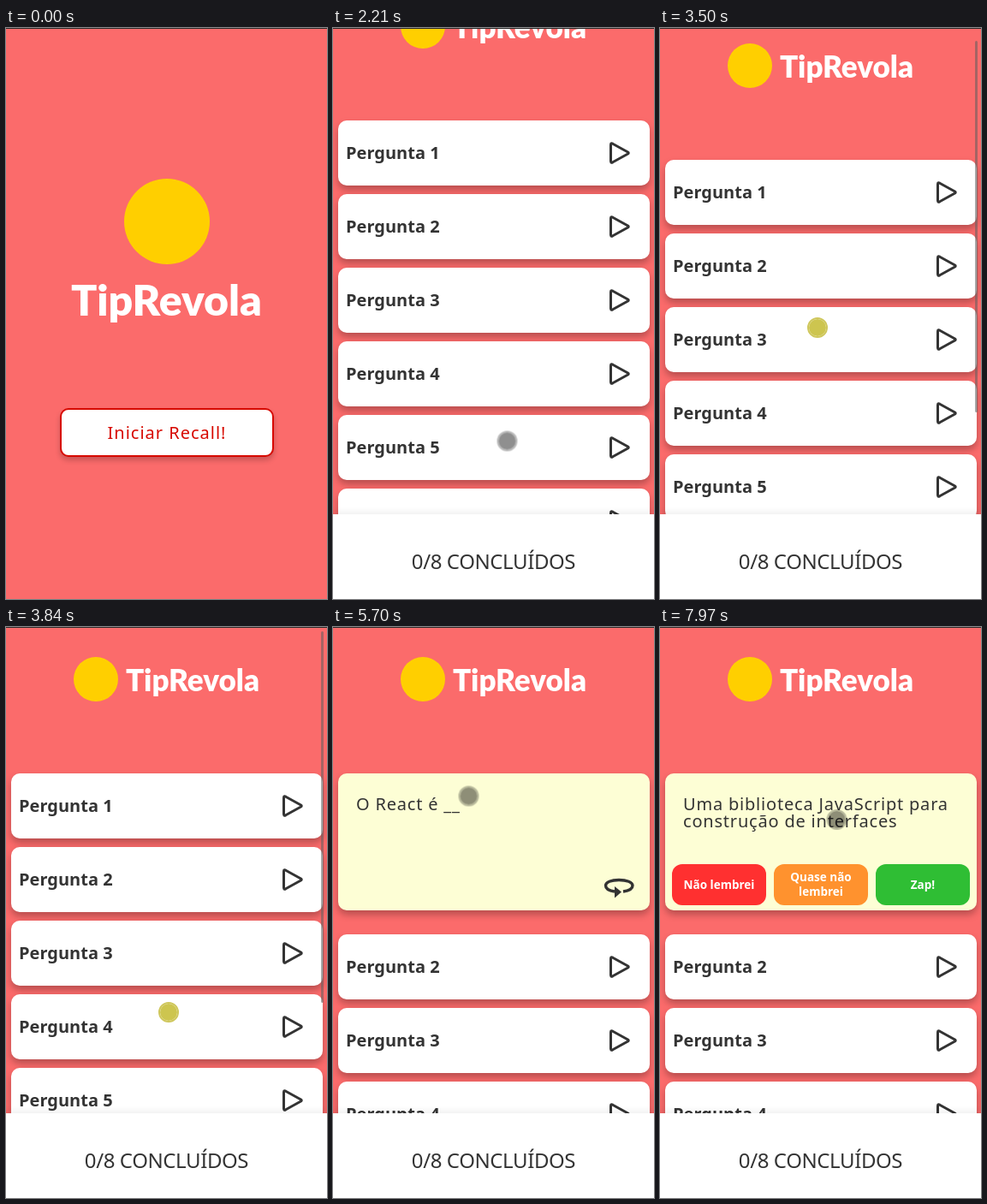
These frames come from a looping animation (375 by 667 pixels, 8 s). An HTML page:

```html
<!DOCTYPE html>
<html lang="pt-BR">
<head>
<meta charset="utf-8">
<title>Flashcards</title>
<style>
  html, body { margin: 0; width: 100%; height: 100%; overflow: hidden; background: #fb6b6b; }
  body { position: relative; font: 400 20px/20px "Noto Sans", "Open Sans", sans-serif; color: #333; }
  div, svg { position: absolute; box-sizing: border-box; white-space: nowrap; }

  /* Every track shares one clock; values hold unless a keyframe says otherwise. */
  .track { animation: 8s steps(1) infinite; }

  #stage { left: 0; top: 0; width: 375px; height: 667px; overflow: hidden; background: #fb6b6b; }
  .full { inset: 0; }
  .edge { left: 0; top: 0; width: 100%; height: 1px; background: #2b2b2b; }

  .mark { border-radius: 50%; background: #ffcf00; }
  .brand { font-family: Lato, Inter, sans-serif; font-weight: 900; color: #fff; text-align: center; }

  #home { animation-name: home; }
  #home .mark { left: 138px; top: 176px; width: 100px; height: 100px; }
  #home .brand { left: 0; top: 287px; width: 375px; font-size: 50px; line-height: 60px; }
  .start {
    left: 63px; top: 444px; width: 250px; height: 57px; border: 2px solid #d70900; border-radius: 10px;
    background: #fff; color: #d70900; text-align: center; line-height: 53px; letter-spacing: 1px;
    box-shadow: 0 4px 6px rgba(0, 0, 0, .2);
  }

  #deck { animation-name: deck; }
  #scroll { animation-name: scroll; }
  #deck .mark { left: 79px; top: 35px; width: 52px; height: 52px; }
  #deck .brand { left: 118px; top: 41px; width: 200px; font-size: 35px; line-height: 40px; }

  .card {
    left: 6px; width: 364px; height: 76px; border-radius: 10px; background: #fff;
    box-shadow: 0 5px 9px rgba(0, 0, 0, .27);
    padding-left: 9px; font-weight: 700; line-height: 75px;
  }
  .card svg { left: 314px; top: 23px; width: 30px; height: 30px; }
  #closed { animation-name: closed; }
  #rest { animation-name: shift; }

  .open {
    top: 171px; height: 160px; padding: 26px 0 0 21px; background: #fdfed5;
    font-weight: 400; line-height: 20px; letter-spacing: .8px;
  }
  #ask { animation-name: ask; }
  #ask svg { left: 306px; top: 118px; width: 44px; height: 32px; }
  #answer { animation-name: answer; }
  .rate {
    top: 106px; width: 110px; height: 48px; border-radius: 12px; color: #fff; text-align: center;
    display: flex; align-items: center; justify-content: center;
    font-size: 13.5px; font-weight: 600; line-height: 17px; letter-spacing: 0;
  }

  .foot {
    left: 0; top: 568px; width: 375px; height: 99px; background: #fff; text-align: center;
    font-size: 24px; line-height: 24px; padding-top: 43px; letter-spacing: -.4px;
    box-shadow: 0 -4px 6px rgba(0, 0, 0, .05);
  }
  #thumb {
    left: 368px; top: 5px; width: 3px; height: 434px; border-radius: 2px;
    background: rgba(95, 95, 95, .55); animation-name: thumb;
  }
  #touch { left: -12px; top: -12px; width: 24px; height: 24px; animation-name: touch; }
  #dot {
    inset: 0; border-radius: 50%; border: 2px solid rgba(0, 0, 0, .27);
    background: rgba(0, 0, 0, .44); background-clip: padding-box; animation-name: press;
  }

  @keyframes home { 0% { visibility: visible } 26.75%, 100% { visibility: hidden } }
  @keyframes deck { 0% { visibility: hidden } 26.75%, 100% { visibility: visible } }
  @keyframes closed { 0% { opacity: 1 } 61%, 100% { opacity: 0 } }
  @keyframes ask { 0% { opacity: 0 } 61% { opacity: 1 } 79.125%, 100% { opacity: 0 } }
  @keyframes answer { 0% { opacity: 0 } 79.125%, 100% { opacity: 1 } }
  @keyframes shift { 0% { transform: none } 61%, 100% { transform: translateY(102px) } }
  @keyframes scroll {
    0% { transform: translateY(-63px) }
    41.125% { transform: translateY(-63px); animation-timing-function: steps(3) }
    43.75% { transform: translateY(-17px) }
    44.625%, 100% { transform: translateY(0) }
  }
  @keyframes thumb {
    0% { opacity: 0; transform: translateY(38px) }
    41.125% { opacity: 1; transform: translateY(38px); animation-timing-function: steps(3) }
    43.75% { opacity: 1; transform: translateY(10px) }
    44.625% { opacity: 1; transform: none }
    49.75% { opacity: .5; transform: none }
    51.5%, 100% { opacity: 0; transform: none }
  }
  @keyframes press {
    0% { background-color: rgba(0, 0, 0, .44); border-color: rgba(0, 0, 0, .27) }
    39.375% { background-color: #cdc54f; border-color: #cfc75c }
    51.5%, 100% { background-color: rgba(0, 0, 0, .44); border-color: rgba(0, 0, 0, .27) }
  }
  @keyframes touch {
    0% { opacity: 0; transform: translate(148px, 287px) }
    4.875% { opacity: 1; transform: translate(148px, 287px) }
    5.75% { opacity: 1; transform: translate(186px, 352px) }
    6.625% { transform: translate(232px, 430px) }
    7.5% { transform: translate(209px, 487px) }
    19.25% { transform: translate(206px, 485px) }
    20.125% { transform: translate(203.5px, 482.5px) }
    35.875% { transform: translate(200px, 450px); animation-timing-function: steps(4) }
    39.375% { transform: translate(184px, 288px); animation-timing-function: steps(2) }
    41.125% { transform: translate(184px, 304px); animation-timing-function: steps(3) }
    43.75% { transform: translate(184px, 350px) }
    44.625% { transform: translate(186px, 367px) }
    45.375% { transform: translate(188px, 390px); animation-timing-function: steps(3) }
    48% { transform: translate(190px, 450px) }
    51.5% { transform: translate(192px, 438px); animation-timing-function: steps(4) }
    55% { transform: translate(268px, 250px); animation-timing-function: steps(2) }
    56.75% { transform: translate(332.5px, 230.5px); animation-timing-function: steps(2) }
    58.5% { transform: translate(334px, 212px) }
    68.625% { transform: translate(316px, 210px); animation-timing-function: steps(3) }
    71.25% { transform: translate(158.5px, 197.5px); animation-timing-function: steps(2) }
    73% { transform: translate(136px, 201px); animation-timing-function: steps(2) }
    74.75% { transform: translate(160px, 216px); animation-timing-function: steps(4) }
    78.25% { transform: translate(335px, 314px) }
    79.125% { transform: translate(338px, 315px); animation-timing-function: steps(3) }
    82.5% { transform: translate(341.5px, 316.5px) }
    86.75% { transform: translate(338px, 315px); animation-timing-function: steps(3) }
    89.375% { transform: translate(318px, 310px) }
    92.625% { transform: translate(314px, 305px); animation-timing-function: steps(3) }
    95.25% { transform: translate(289px, 270px); animation-timing-function: steps(5) }
    99.625%, 100% { opacity: 1; transform: translate(206.5px, 225px) }
  }
</style>
</head>
<body>
<div id="stage">
  <div id="home" class="full track">
    <div class="mark"></div>
    <div class="brand">TipRevola</div>
    <div class="start">Iniciar Recall!</div>
  </div>

  <div id="deck" class="full track">
    <div id="scroll" class="full track">
      <div class="mark"></div>
      <div class="brand">TipRevola</div>
      <div id="closed" class="full track"></div>
      <div id="ask" class="card open track">O React é __
        <svg viewBox="0 0 44 32" fill="none" stroke="#333" stroke-width="3.4">
          <path d="M17 20C10 19 6.500 16.500 6.500 13 6.500 9 13 6.500 22 6.500S38 9 38 13C38 16.500 34 19 27 20"/>
          <path d="M17 14l8 6.500-8 7z" fill="#333" stroke="none"/>
        </svg>
      </div>
      <div id="answer" class="card open track">Uma biblioteca JavaScript para<br>construção de interfaces
        <div class="rate" style="left:8px;background:#ff3030">Não lembrei</div>
        <div class="rate" style="left:127px;background:#ff922e">Quase não<br>lembrei</div>
        <div class="rate" style="left:246px;background:#2fbe34">Zap!</div>
      </div>
      <div id="rest" class="full track"></div>
    </div>
    <div class="foot">0/8 CONCLUÍDOS</div>
    <div id="thumb" class="track"></div>
  </div>

  <div id="touch" class="track"><div id="dot" class="track"></div></div>
  <div class="edge"></div>
</div>
<script>
  const play = `<svg viewBox="0 0 30 30" fill="none" stroke="#333" stroke-width="3" stroke-linejoin="round">
    <path d="M4.500 5.500Q4.500 3 6.800 4.200L24.500 14Q26 15 24.500 16L6.800 25.800Q4.500 27 4.500 24.500Z"/></svg>`;
  const card = n => `<div class="card" style="top:${85 + 86 * n}px">Pergunta ${n}${play}</div>`;
  document.getElementById('closed').innerHTML = card(1);
  document.getElementById('rest').innerHTML = [2, 3, 4, 5, 6, 7, 8].map(card).join('');
</script>
</body>
</html>
```
